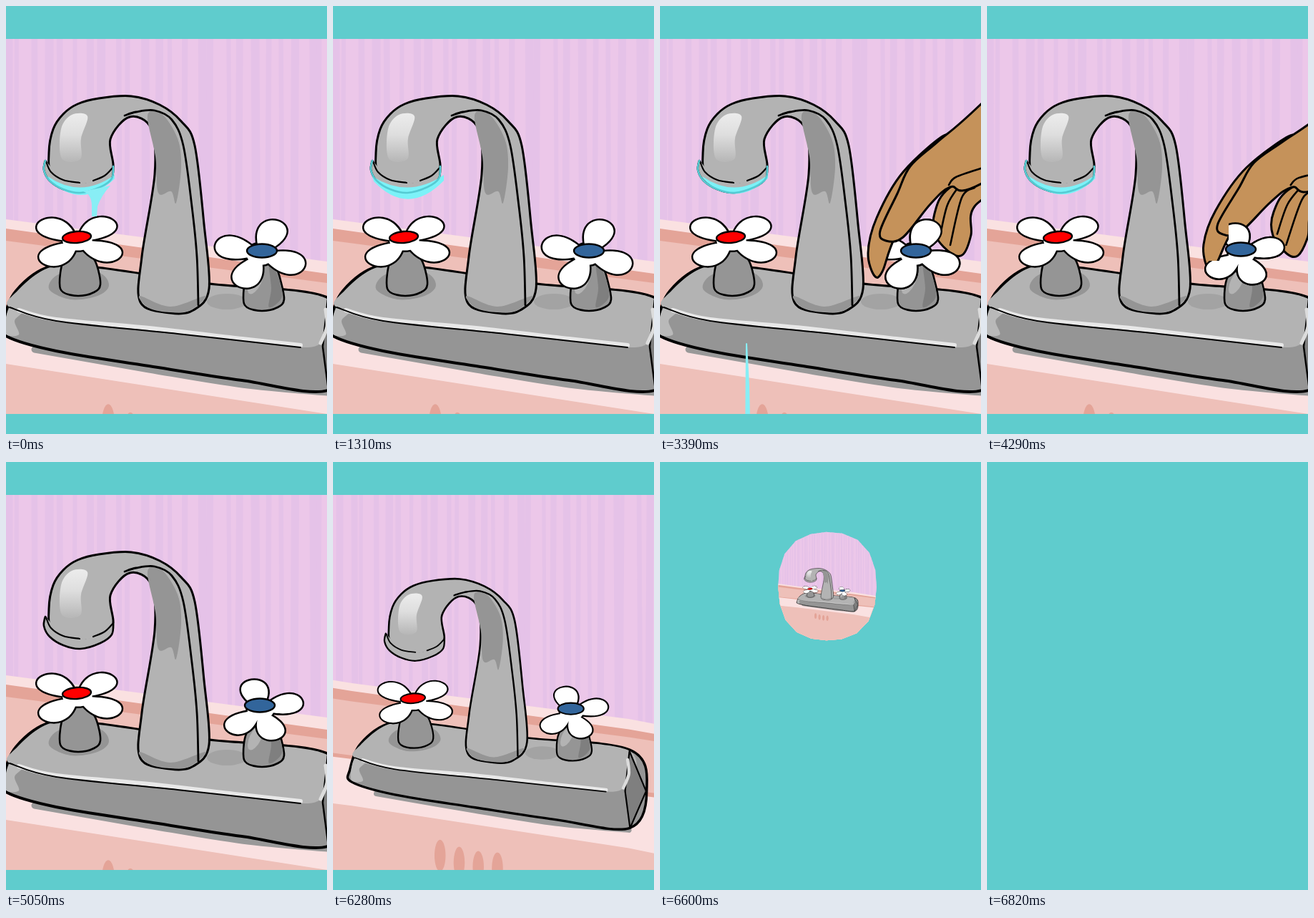
An HTML page with a canvas that plays this animation: 449 px wide and 598 px high, repeating every 7.23 s.

```html
<!DOCTYPE html>
<html lang="en">
<head>
<meta charset="utf-8">
<title>Dripping tap</title>
<style>
html, body { margin: 0; width: 100%; height: 100%; overflow: hidden; background: #5fcccd; }
canvas { display: block; }
</style>
</head>
<body>
<canvas id="stage" width="449" height="598"></canvas>
<script>
const ctx = document.getElementById('stage').getContext('2d');
const LOOP = 7230, TURN = Math.PI * 2, DEG = Math.PI / 180;
const TEAL = '#5fcccd', SKIN = '#c5925a', WATER = '#7cf2f8', DRIP = '#88eef5';
const LIGHT = '#b3b3b3', MID = '#959595', DARK = '#7f7f7f';
const PALE = '#fae1e1', PINK = '#eec0b9', SALMON = '#e4a498';

const clamp = v => Math.max(0, Math.min(1, v));
const mix = (a, b, k) => a + (b - a) * k;
const ramp = (t, a, b) => clamp((t - a) / (b - a));
const ease = k => k * k * (3 - 2 * k);

// Interpolates rows of [time, ...values].
function track(keys, t) {
  let i = 1;
  while (i < keys.length - 1 && t > keys[i][0]) i++;
  const a = keys[i - 1], b = keys[i], k = ramp(t, a[0], b[0]);
  return a.slice(1).map((v, j) => mix(v, b[j + 1], k));
}

// Smooth curve through a flat list of points.
function curve(p, closed = true) {
  const n = p.length / 2;
  const at = i => {
    i = closed ? (i + n) % n : Math.max(0, Math.min(n - 1, i));
    return [p[2 * i], p[2 * i + 1]];
  };
  ctx.beginPath();
  ctx.moveTo(p[0], p[1]);
  for (let i = 0; i < (closed ? n : n - 1); i++) {
    const [a, b, c, d] = [at(i - 1), at(i), at(i + 1), at(i + 2)];
    ctx.bezierCurveTo(b[0] + (c[0] - a[0]) / 6, b[1] + (c[1] - a[1]) / 6,
      c[0] - (d[0] - b[0]) / 6, c[1] - (d[1] - b[1]) / 6, c[0], c[1]);
  }
  if (closed) ctx.closePath();
}

function paint(fill, width, color = '#000') {
  if (fill) { ctx.fillStyle = fill; ctx.fill(); }
  if (width) { ctx.lineWidth = width; ctx.strokeStyle = color; ctx.stroke(); }
}

function blob(p, fill, width) { curve(p); paint(fill, width); }
function line(p, width, color) { curve(p, false); paint(null, width, color); }

function poly(p, fill, width) {
  ctx.beginPath();
  for (let i = 0; i < p.length; i += 2) ctx.lineTo(p[i], p[i + 1]);
  ctx.closePath();
  paint(fill, width);
}

function oval(x, y, rx, ry, rot, fill, width) {
  ctx.beginPath();
  ctx.ellipse(x, y, rx, ry, rot, 0, TURN);
  paint(fill, width);
}

// Fills everything below a sloping edge: heights at the far left, x = 0, x = 449 and the far right.
function slope(a, b, c, d, fill) {
  poly([-180, a, 0, b, 449, c, 660, d, 660, 900, -180, 900], fill);
}

function room() {
  ctx.fillStyle = '#ecc7e9';
  ctx.fillRect(-180, -230, 840, 660);
  for (let i = 0; i < 43; i++) {
    const x = -178 + i * 19.3 + Math.sin(i * 2.3) * 3;
    const w = 9 + Math.sin(i * 1.7) * 3, lean = Math.sin(i * 3.1) * 4;
    poly([x, -230, x + w, -230, x + w + lean, 420, x + lean, 420], '#e5c2e8');
  }
  slope(268, 298, 357, 398, PALE);
  slope(280, 311, 374, 412, SALMON);
  slope(300, 328, 387, 420, PINK);
  slope(394, 417, 474, 501, SALMON);
  slope(400, 423, 481, 508, PALE);
  slope(478, 500, 570, 614, PINK);
  for (let i = 0; i < 4; i++) oval(143 + i * 31, 603 - 2.3 * (3 - i) ** 2, 9, 26, 0, SALMON);
}

function base() {
  line([40, 480, 200, 508, 330, 529, 449, 540], 9, '#999');
  blob([62, 364, 14, 398, -3, 440, 0, 461, 70, 482, 200, 503, 330, 523, 450, 537,
    478, 476, 451, 408, 280, 388, 130, 366], MID, 4);
  blob([62, 365, 14, 400, 5, 421, 70, 437, 200, 449, 330, 465, 436, 474, 449, 409, 280, 389, 130, 367], LIGHT);
  poly([450, 410, 477, 476, 451, 537, 443, 476], DARK, 2.5);
  blob([4, 423, 22, 428, 12, 440, 18, 459, -1, 457], '#b9b9b9');
  line([18, 425, 70, 438, 200, 450, 330, 465, 412, 474], 6, '#e8e8e8');
  line([447, 424, 449, 448, 440, 471], 5, '#dcdcdc');
  line([5, 421, 70, 440, 240, 458, 412, 477], 2);
  blob([60, 395, 76, 374, 128, 372, 144, 390, 128, 405, 90, 410], MID);
  oval(309, 413, 28, 11, 0, '#a3a3a3');
}

function lip(color) {
  line([55, 216, 53, 229, 61, 244, 80, 256, 104, 261, 132, 253, 148, 241, 150, 224], 2.6, color);
}

function spout() {
  blob([60, 205, 66, 172, 80, 151, 100, 137, 130, 129, 175, 126, 215, 138, 245, 161, 264, 195, 277, 305, 284, 395,
    262, 425, 230, 429, 188, 414, 190, 350, 208, 235, 203, 171, 173, 155, 146, 186, 148, 232, 104, 250, 65, 235], LIGHT, 3);
  blob([198, 153, 218, 151, 240, 185, 245, 225, 238, 275, 231, 259, 213, 261, 209, 210], MID);
  blob([187, 405, 230, 420, 279, 405, 258, 425, 230, 428, 200, 422], MID);
  line([166, 153, 182, 148, 208, 146, 232, 159, 248, 195, 260, 280, 267, 350, 269, 418], 2.8);
  const shine = ctx.createLinearGradient(0, 150, 0, 216);
  shine.addColorStop(0, '#ececec');
  shine.addColorStop(.45, '#dedede');
  shine.addColorStop(1, '#b8b8b8');
  blob([77, 172, 92, 152, 114, 154, 105, 185, 104, 214, 78, 213], shine);
  blob([55, 216, 53, 230, 61, 244, 80, 256, 104, 261, 132, 253, 148, 241, 150, 224, 122, 244, 102, 247, 76, 241], LIGHT);
  lip('#000');
  line([56, 217, 63, 232, 80, 243, 103, 247], 2.2);
  line([122, 244, 138, 237, 150, 225], 2.2);
}

function stem(x, y, lean) {
  ctx.save();
  ctx.translate(x, y);
  blob([lean, 0, 14 + lean / 2, 8, 24, 25, 29, 52, 20, 63, -2, 68, -23, 63, -28, 50, -24, 22, -13 + lean / 2, 7], MID, 2.6);
  if (lean) {
    blob([8, 3, 19, 16, 26, 48, 8, 63, 11, 36], DARK);
    oval(-11, 27, 8, 19, .45, LIGHT);
  }
  ctx.restore();
}

// Round petals on a tilted disc; outlined first, then filled, so that they join.
function flower(x, y, rx, ry, angles) {
  const shape = new Path2D();
  for (const a of angles) {
    const c = Math.cos(a * DEG), s = Math.sin(a * DEG);
    const px = side => x + rx * (c / .75 - side * s * 1.05);
    const py = side => y + ry * (s / .75 + side * c * 1.05);
    shape.moveTo(x, y);
    shape.bezierCurveTo(px(-1), py(-1), px(1), py(1), x, y);
  }
  shape.moveTo(x + rx * .3, y);
  shape.ellipse(x, y, rx * .3, ry * .3, 0, 0, TURN);
  ctx.lineWidth = 5;
  ctx.strokeStyle = '#000';
  ctx.stroke(shape);
  ctx.fillStyle = '#fff';
  ctx.fill(shape);
}

function coldPetals(k) {
  const open = [21, 116, 197, 292], shut = [69, 137, 258, 341];
  flower(356, 347, 65 - 4 * k, 50 - 7 * k, open.map((a, i) => mix(a, shut[i], k)));
  oval(358 - 3 * k, 342 - 2 * k, 21, 9.5, 0, '#32659b', 2.4);
}

function hand(x, y, rot) {
  ctx.save();
  ctx.translate(x + 355, y + 340);
  ctx.rotate(rot);
  ctx.translate(-355, -340);
  blob([480, 215, 405, 254, 384, 290, 386, 322, 408, 346, 424, 347, 435, 320, 440, 280, 500, 235], SKIN, 3);
  line([418, 252, 402, 278, 392, 320], 2.6);
  line([440, 254, 422, 268, 406, 334], 2.6);
  blob([400, 180, 340, 232, 303, 296, 291, 345, 300, 377, 311, 371, 329, 322, 380, 230], SKIN, 3);
  blob([640, -50, 449, 137, 388, 190, 350, 224, 332, 262, 308, 314, 316, 328, 340, 323, 378, 277, 406, 253,
    450, 248, 660, 120], SKIN, 3);
  line([404, 250, 414, 239, 452, 226], 2.6);
  ctx.restore();
}

// Water swells along the lip, then a drip stretches and lets go.
function water(t) {
  const cycle = [-1335, 270, 1890, 3480];
  let swell, p = 0;
  if (t < 3480) {
    const i = cycle.findIndex(end => t < end);
    p = ramp(t, cycle[i - 1], cycle[i]) * 1605;
    swell = 1 - .45 * (1 - ramp(p, 150, 810)) ** 2 - .45 * ramp(p, 1080, 1400);
  } else {
    swell = track([[3480, .55], [3900, .8], [4380, .55], [4900, 0]], t)[0];
  }
  if (swell < .04) return;

  const half = 41 + 9 * swell, low = 254 + 16 * swell, edge = 238 + 7 * swell;
  ctx.beginPath();
  ctx.moveTo(105 - half, 238);
  ctx.quadraticCurveTo(105, 270, 105 + half, 236);
  ctx.lineTo(105 + half, edge - 1);
  ctx.quadraticCurveTo(105, 2 * low - edge, 107 - half, edge);
  ctx.closePath();
  paint(WATER);
  lip('#55cbd3');

  if (p > 1150 && p < 1390) {
    const tip = p < 1335 ? mix(264, 292, ramp(p, 1150, 1335)) : 292 + (p - 1335) * 2.1;
    const neck = Math.min(tip, 280);
    ctx.beginPath();
    ctx.moveTo(108, 259);
    ctx.quadraticCurveTo(120, 263, 120, neck);
    ctx.lineTo(120, tip);
    ctx.lineTo(127, tip);
    ctx.lineTo(128, neck);
    ctx.quadraticCurveTo(133, 265, 146, 251);
    ctx.closePath();
    paint(DRIP);
  } else if (p >= 1390) {
    const top = 262 + 209 * ((p - 1390) / 125) ** 1.25;
    poly([120, top, 122, top, 125, top + 60, 127, top + 150, 119, top + 150], DRIP);
  }
}

// Hand-cut round frame around the whole room.
function vignette() {
  const p = [];
  for (let i = 0; i < 20; i++) {
    const a = i / 20 * TURN;
    const r = 1 + .06 * Math.sin(2 * a) ** 2 + .03 * Math.cos(a + Math.PI / 4);
    p.push(228 + 388 * r * Math.cos(a), 308 + 518 * r * Math.sin(a));
  }
  poly(p);
}

const VIEW = [[6240, 0, 0, 1, 1], [6420, 115.6, 249, .398, .328], [6500, 151, 184, .264, .218],
  [6620, 200, 120, .161, .1325], [6820, 230, -45, .1, .082]];
const REACH = [[2780, 168, 10, 0], [3300, 0, 0, 0], [3570, 0, 0, 0], [4290, 12, -5, .1], [4900, 75, -166, 0]];

function draw(t) {
  ctx.setTransform(1, 0, 0, 1, 0, 0);
  ctx.fillStyle = TEAL;
  ctx.fillRect(0, 0, 449, 598);
  if (t >= 6820) return;
  ctx.save();
  ctx.lineJoin = ctx.lineCap = 'round';
  ctx.beginPath();
  ctx.rect(0, 46, 449, 524);
  ctx.clip();
  const [x, y, sx, sy] = track(VIEW, t);
  ctx.translate(x, y);
  ctx.scale(sx, sy);
  vignette();
  ctx.clip();

  const turn = ease(ramp(t, 3570, 4290));
  room();
  base();
  spout();
  stem(103, 337, 0);
  flower(100, 329, 69, 42, [32, 133, 222, 314]);
  oval(99, 323, 20, 8, -.08, '#f00', 2.4);
  stem(360, 358, 8);
  coldPetals(turn);
  if (t >= 2780 && t < 5050) {
    hand(...track(REACH, t));
    if (t < 4380) {
      // The near petals lie over the fingers.
      ctx.save();
      ctx.beginPath();
      ctx.rect(338, 290, 120, 66);
      ctx.rect(280, 356, 180, 60);
      ctx.clip();
      coldPetals(turn);
      ctx.restore();
    }
  }
  water(t);
  ctx.restore();
}

const begin = performance.now();
function tick() {
  draw((performance.now() - begin) % LOOP);
  requestAnimationFrame(tick);
}
tick();
</script>
</body>
</html>
```
